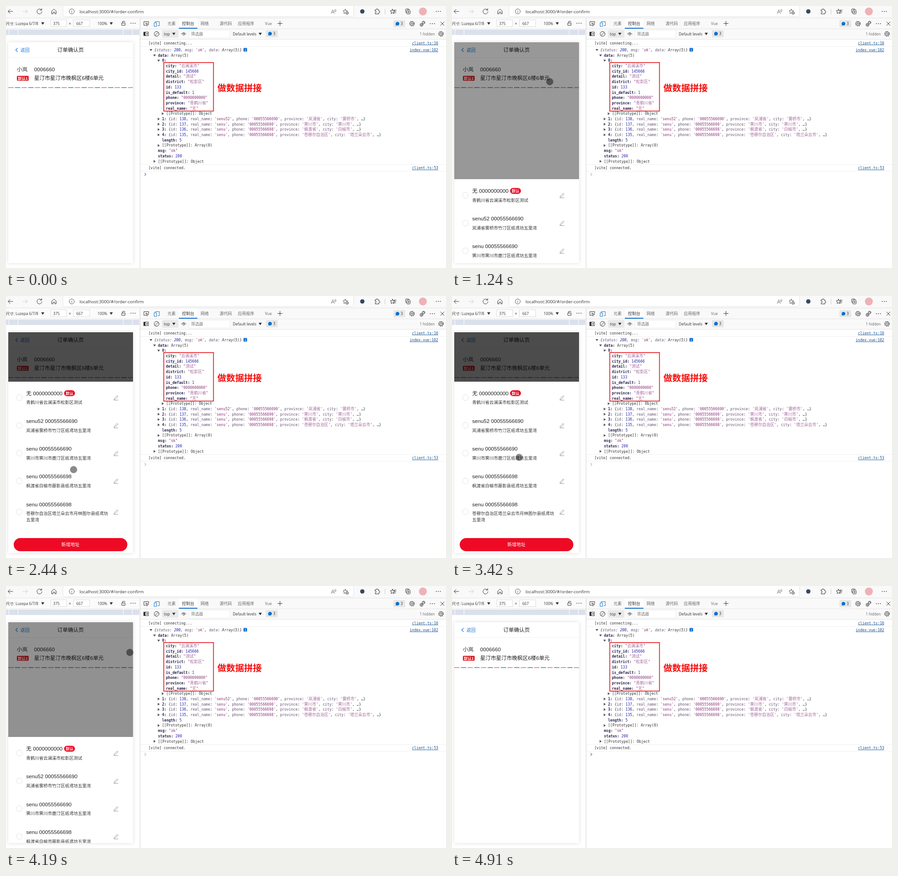
Animation, 970 px wide and 578 px high, one loop 5.77 s. Source, as an HTML page:

```html
<!DOCTYPE html>
<html lang="zh-CN">
<head>
<meta charset="utf-8">
<title>订单确认页</title>
<style>
  html, body { margin: 0; width: 100%; height: 100%; overflow: hidden; background: #fff; }
  svg { display: block; width: 970px; height: 578px; }
  text { white-space: pre; }
  .ui { font: 8.3px "Open Sans", "Noto Sans CJK SC", sans-serif; fill: #333; }
  .tab { font-size: 9px; fill: #666; }
  .mono { font: 8px "DejaVu Sans Mono", "Noto Sans CJK SC", monospace; fill: #303030; }
  .mono .key { font-weight: bold; fill: #29234f; }
  .mono .name { fill: #65506f; }
  .mono .str { fill: #8a3579; }
  .mono .num { fill: #2020a8; }
  .mono .han { font-size: 8.9px; font-weight: 300; fill: #a5679a; }
  .mono .link { fill: #15508f; text-decoration: underline; }
  .app { font: 11.7px "Liberation Sans", "Noto Sans CJK SC", sans-serif; fill: #222; }
  .small { font-size: 9.5px; fill: #333; }
  .tag { font-size: 8.5px; font-weight: bold; fill: #fff; }
  .icon { fill: none; stroke: #333; stroke-width: 1; stroke-linecap: round; stroke-linejoin: round; }
  .rule { stroke: #e4e4e4; fill: none; }
  .solid { fill: #333; stroke: none; }
</style>
</head>
<body>
<svg viewBox="0 0 970 578">
  <defs>
    <clipPath id="screen"><rect x="5" y="80" width="274.4" height="487"/></clipPath>
    <path id="down" d="M-3.5 -2.5h7l-3.5 5.5z"/>
    <g id="gear" stroke-width=".9"><circle r="4.2"/><circle r="1.7"/><circle r="5.2" stroke-width="1.3" stroke-linecap="butt" stroke-dasharray="2 2.08"/></g>
    <g id="dots"><circle cx="-4.5" r=".9"/><circle r=".9"/><circle cx="4.5" r=".9"/></g>
    <path id="star" d="M0 -5 1.5 -1.7 5 -1.3 2.4 1.1 3.1 4.6 0 2.9 -3.1 4.6 -2.4 1.1 -5 -1.3 -1.5 -1.7z"/>
    <g id="count"><rect width="26" height="16" rx="2" fill="#e7e7e7"/><path d="M9 4a4 4 0 1 1-2 7.4L4.8 12l.7-2A4 4 0 0 1 9 4z" fill="#0b6fd0"/><text x="16" y="11.2" class="ui">3</text></g>
    <path id="pencil" d="M-4 2.5 2.5 -4.5 4.5 -2.7 -2 3.7 -4.5 4.2zM-5 5.6H5" fill="none" stroke="#8b8c90" stroke-width=".9"/>
  </defs>

  <!-- browser bar -->
  <rect width="970" height="26" fill="#f9f9f9"/>
  <rect x="125.5" y="-8" width="641" height="31.5" rx="4" fill="#fff" stroke="#e3e3e3"/>
  <g class="icon">
    <path d="M15 12H4.5M9 7.5 4.5 12 9 16.5"/>
    <path d="M37 12H47.5M43 7.5 47.5 12 43 16.5" stroke="#ccc"/>
    <path d="M78 8.5A5.5 5.5 0 1 0 79.3 12.5M78.8 5.5V9H75.3"/>
    <path d="M101 11 105.8 6.8 110.6 11V17.2H107.6V13.5H104V17.2H101z"/>
    <circle cx="145" cy="12" r="5.5" stroke="#555"/><path d="M145 11.5V14.5M145 9.3V9.4" stroke="#555"/>
    <path d="M717 16.5 720.5 8 724 16.5M718.2 13.8H722.8M724.5 8.5q1.5 1.5 0 3.5M726.5 7q2.5 2.5 0 6" stroke="#777"/>
    <use href="#star" x="748" y="12" stroke="#555"/><circle cx="752" cy="15.5" r="3" fill="#fff" stroke="#555"/><path d="M750.5 15.5h3M752 14v3" stroke="#555" stroke-width=".8"/>
    <path d="M814 8.5h2.2a1.8 1.8 0 1 1 3.5 0H822v2.7a1.8 1.8 0 1 1 0 3.5v2.8h-8v-2.8a1.8 1.8 0 1 0 0-3.5z"/>
    <path d="M835.5 7V18" stroke="#ccc"/>
    <use href="#star" x="852" y="12"/><path d="M855 9H860M856 12H860M855 15H859" stroke-width="1.1"/>
    <rect x="881" y="6.5" width="7.5" height="8" rx="1.5"/><rect x="883.5" y="9" width="7.5" height="8.5" rx="1.5" fill="#f9f9f9"/><path d="M885.3 13.2h4M887.3 11.2v4"/>
  </g>
  <circle cx="785.5" cy="12" r="4.8" fill="#35495e"/>
  <circle cx="919" cy="12" r="8.7" fill="#efb1b6"/>
  <use href="#dots" x="953" y="12" class="solid"/>
  <text x="162" y="15.6" class="ui" style="font-size:9.7px">localhost:3000/#/order-confirm</text>

  <!-- device toolbar and ruler -->
  <rect y="26" width="295" height="25" fill="#fbfbfb"/>
  <path class="rule" d="M0 26.5H970M0 50.5H295"/>
  <g class="ui">
    <text x="0" y="42">尺寸: Luzepa 6/7/8</text>
    <rect x="98.5" y="30.5" width="35" height="15" fill="#fff" stroke="#dcdcdc"/><text x="104" y="42">375</text>
    <text x="138.5" y="42">×</text>
    <rect x="148.5" y="30.5" width="36" height="15" fill="#fff" stroke="#dcdcdc"/><text x="155" y="42">667</text>
    <text x="202" y="42">100%</text>
    <use href="#down" x="81" y="38.5"/><use href="#down" x="232" y="38.5"/>
    <use href="#dots" x="280" y="38"/>
  </g>
  <path class="icon" d="M255.5 37.5h7v5h-7zM257 37.5V34h4M261 34l1.5 1"/>
  <rect y="52" width="294" height="12" fill="#dbe1eb"/>
  <path d="M6.5 52V64M26.5 52V64M258.5 52V64M278.5 52V64" stroke="#fff"/>

  <!-- phone page -->
  <rect x="5" y="80" width="275" height="487" fill="#fff" style="filter:drop-shadow(0 0 4px rgba(0,0,0,.13))"/>
  <path d="M5 113.5H280" stroke="#f0f1f3"/>
  <g class="app">
    <path d="M25.5 93 21.5 97 25.5 101" fill="none" stroke="#1978dc" stroke-width="1.2"/>
    <text x="32" y="100.5" style="font-size:10px;fill:#1978dc">返回</text>
    <text x="113" y="100.7">订单确认页</text>
    <text x="24" y="143.5">小岚</text><text x="62" y="143.5">0006660</text>
    <rect x="24" y="154" width="26" height="11" rx="2" fill="#dd2128"/>
    <text x="26" y="162.7" class="tag">默认1</text>
    <text x="62" y="162.8">星汀市星汀市晚枫区6楼6单元</text>
  </g>
  <g fill="none" stroke-width="1.5" stroke-dasharray="11.7 17.63">
    <path d="M5 180H280" stroke="#ee6a6c"/><path d="M19.7 180H280" stroke="#2b83dd"/>
  </g>
  <g clip-path="url(#screen)">
    <rect id="shade" x="5" y="80" width="275" height="487" opacity="0"/>
    <g id="sheet" class="app">
      <rect x="5" y="189" width="275" height="378" fill="#fff"/>
      <g id="people"></g>
      <rect x="17" y="534" width="250.5" height="29" rx="14.5" fill="#ee0a24"/>
      <text x="142" y="552.4" text-anchor="middle" style="font-size:10px;font-weight:500;fill:#fff">新增地址</text>
    </g>
  </g>

  <!-- developer tools -->
  <rect x="295" y="27" width="675" height="47" fill="#f9f9f9"/>
  <rect x="381" y="27" width="41" height="23" fill="#fff"/>
  <path class="rule" d="M296 50.5H970M296 73.5H970"/>
  <path d="M295.5 27V578" stroke="#d2d2d2"/>
  <rect x="381" y="48" width="41" height="2" fill="#1573cf"/>
  <g class="icon">
    <path d="M308 42.5H304V34.5H314.5V38M308.5 37.5 314.5 40.3 311.8 41.2 310.8 44z"/>
    <path d="M329 36V34.5H338V43.5H335M327 37h5v8h-5z" stroke="#1573cf"/>
    <path d="M599 38.5H609M604 33.5V43.5"/>
    <use href="#gear" x="895" y="39"/>
    <path d="M914 41.5h4M916 39.5v4M919.5 35.5l2-2 2 2-2 2z" stroke-width=".8"/><circle cx="916" cy="41.5" r="3.3"/><circle cx="920.5" cy="36.5" r="3"/>
    <path d="M958 35 966 43M966 35 958 43"/>
    <rect x="304" y="57.5" width="10" height="8"/><path class="solid" d="M304 57.5h3.5v8H304zM309 61.5l3-2.2v4.4z"/>
    <circle cx="332" cy="61.5" r="5.3"/><path d="M328.3 65.2 335.7 57.8"/>
    <path d="M386.5 62q5-6.5 10.5 0"/><circle cx="391.8" cy="62.5" r="2"/>
    <use href="#gear" x="959" y="61.5"/>
  </g>
  <use href="#dots" x="940" y="39" class="solid"/>
  <use href="#count" x="854" y="31"/><use href="#count" x="573" y="53"/>
  <g class="ui">
    <text x="356" y="42" class="tab">元素</text><text x="388" y="42" style="font-size:9px">控制台</text>
    <text x="429" y="42" class="tab">网络</text><text x="471" y="42" class="tab">源代码</text>
    <text x="511" y="42" class="tab">应用程序</text><text x="571" y="42" class="tab" style="font-size:8.5px">Vue</text>
    <rect x="344" y="53" width="36" height="17" rx="2" fill="#e9e9e9"/><text x="348" y="64.8">top</text>
    <use href="#down" x="370" y="61.5"/>
    <rect x="403.5" y="53.5" width="90" height="17" fill="#fff" stroke="#eee"/><text x="408" y="65" style="font-size:8.8px;fill:#777">筛选器</text>
    <text x="500" y="64.8">Default levels</text><use href="#down" x="560.5" y="61.5"/>
    <text x="912" y="64.8" style="font-size:8.1px;fill:#666">1 hidden</text>
  </g>
  <path d="M296 89.5H970M296 349.5H970M296 364.5H970" stroke="#f0f0f0"/>
  <g class="mono">
    <text x="314" y="84.6">[vite] connecting...</text><text x="314" y="360.3">[vite] connected.</text>
    <text x="895" y="84.6" class="link">client.ts:16</text>
    <text x="890" y="99.7" class="link">index.vue:102</text>
    <text x="895" y="360.3" class="link">client.ts:53</text>
    <g id="tree"></g>
  </g>
  <rect x="523.5" y="92.5" width="8" height="8" rx="1.5" fill="#1b6fd0"/>
  <path d="M527.5 96V99M527.5 94V94.8" stroke="#fff"/>
  <path id="prompt" d="M305.5 368.5 308.5 371.5 305.5 374.5" fill="none" stroke="#2f7fd6" stroke-width="1.1"/>
  <rect x="347.8" y="124.8" width="109.6" height="107" fill="none" stroke="#e3191c" stroke-width="1.7"/>
  <text x="466" y="187.8" style="font:bold 19.6px 'Noto Sans CJK SC',sans-serif;fill:#f80d0d">做数据拼接</text>

  <g id="cursor">
    <circle id="touch" r="7.6" fill="rgba(0,0,0,.46)" stroke="rgba(0,0,0,.2)"/>
    <path id="arrow" d="M0 0V11.5L2.7 9 4.5 13.2 6.4 12.4 4.6 8.3H8.3z" fill="#fff" stroke="#222" stroke-width=".8"/>
  </g>
</svg>
<script>
const LOOP = 5770;
const $ = id => document.getElementById(id);

// console object tree: indent x, arrow ('v' open, '>' closed), text
const TREE = [
  [335, 'v', 'data: Array(5)'],
  [344, 'v', '0:'],
  [352.5, '', 'city: "云澜溪市"'],
  [352.5, '', 'city_id: 145666'],
  [352.5, '', 'detail: "测试"'],
  [352.5, '', 'district: "松影区"'],
  [352.5, '', 'id: 133'],
  [352.5, '', 'is_default: 1'],
  [352.5, '', 'phone: "0000000000"'],
  [352.5, '', 'province: "青鹤川省"'],
  [352.5, '', 'real_name: "无"'],
  [353, '>', '[[Prototype]]: Object'],
  [344, '>', "1: {id: 138, real_name: 'senu52', phone: '00055566690', province: '岚浦省', city: '雾桥市', …}"],
  [344, '>', "2: {id: 137, real_name: 'senu', phone: '00055566690', province: '霁川市', city: '霁川市', …}"],
  [344, '>', "3: {id: 136, real_name: 'senu', phone: '00055566698', province: '枫渡省', city: '白榆市', …}"],
  [344, '>', "4: {id: 135, real_name: 'senu', phone: '00055566698', province: '苍穆尔自治区', city: '塔兰朵云市', …}"],
  [344, '', 'length: 5'],
  [344, '>', '[[Prototype]]: Array(0)'],
  [335, '', 'msg: "ok"'],
  [335, '', 'status: 200'],
  [335, '>', '[[Prototype]]: Object'],
];

const span = (cls, s) => `<tspan class="${cls}">${s}</tspan>`;
const TOKEN = /Array\(\d\)|(^\w+:)|('[^']*'|"[^"]*")|(\w+(?=:))|(\b\d+\b)/g;
const colour = line => line.replace(TOKEN, (all, key, str, name, num) =>
  key ? span('key', key) :
  str ? span('str', str.replace(/[\u4e00-\u9fff]+/g, han => span('han', han))) :
  name ? span('name', name) :
  num ? span('num', num) : all);

const treeRow = (x, y, mark, line, style = '') => {
  const shape = { v: 'M-3 -2h6l-3 4.5z', '>': 'M-2 -3v6l4.5 -3z' }[mark];
  const arrow = shape ? `<path transform="translate(${x - 7.5} ${y - 2.8})" d="${shape}" fill="#555"/>` : '';
  return `${arrow}<text x="${x}" y="${y}" style="${style}">${colour(line)}</text>`;
};
$('tree').innerHTML =
  treeRow(327, 99.7, 'v', "{status: 200, msg: 'ok', data: Array(5)}", 'font-style:italic') +
  TREE.map(([x, mark, line], i) => treeRow(x, 111.7 + i * 11.69, mark, line)).join('');

// address list
const PEOPLE = [
  ['无 0000000000', '青鹤川省云澜溪市松影区测试'],
  ['senu52 00055566690', '岚浦省雾桥市竹汀区纸鸢坊五里湾'],
  ['senu 00055566690', '霁川市霁川市鹿汀区纸鸢坊五里湾'],
  ['senu 00055566698', '枫渡省白榆市藤影县纸鸢坊五里湾'],
  ['senu 00055566698', '苍穆尔自治区塔兰朵云市月林图尔县纸鸢坊', '五里湾'],
];
$('people').innerHTML = PEOPLE.map(([name, ...address], i) => {
  const y = 214.5 + i * 61.3;
  const mid = y + (address.length > 1 ? 16.5 : 9.7);
  return `<text x="44.5" y="${y + 4}">${name}</text>` +
    address.map((s, n) => `<text x="44.5" y="${y + 23.7 + n * 13.3}" class="small">${s}</text>`).join('') +
    `<circle cx="29.5" cy="${mid}" r="6.5" fill="none" stroke="#d9dadd" stroke-width=".8"/>` +
    `<use href="#pencil" x="242.5" y="${mid}"/>`;
}).join('') +
  '<rect x="128" y="208" width="24" height="13" rx="6.5" fill="#ee0a24"/>' +
  '<text x="140" y="217.7" class="tag" text-anchor="middle">默认</text>';

// motion: [ms, properties, easing to the next key]
const tracks = [];
function track(id, keys) {
  const frames = keys.map(([ms, props, easing = 'linear']) => ({ offset: ms / LOOP, easing, ...props }));
  const motion = $(id).animate(frames, { duration: LOOP, fill: 'both' });
  motion.pause();
  tracks.push(motion);
}
const toggle = (id, prop, first, ...changes) => {
  const keys = [[0, first], ...changes];
  keys.push([LOOP, keys[keys.length - 1][1]]);
  track(id, keys.map(([ms, value]) => [ms, { [prop]: value }, 'steps(1, end)']));
};

const drop = y => ({ transform: `translateY(${y}px)` });
track('sheet', [
  [0, drop(378)], [1140, drop(378), 'ease-out'], [1440, drop(0)],
  [4022, drop(0), 'ease-in'], [4322, drop(378)], [LOOP, drop(378)],
]);
track('shade', [
  [0, { opacity: 0 }], [1140, { opacity: 0 }, 'ease'], [1440, { opacity: .7 }],
  [4022, { opacity: .7 }, 'ease-in'], [4322, { opacity: 0 }], [LOOP, { opacity: 0 }],
]);

const PATH = [
  [0, 500, 600], [70, 500, 548, 'ease-out'], [580, 217, 170], [690, 217, 170], [900, 215.5, 167],
  [2110, 215.5, 167, 'ease-in-out'], [2440, 149, 383], [3380, 149, 383], [3420, 148, 356, 'ease-out'],
  [3910, 162, 122], [4040, 162, 122, 'ease-in'], [4190, 273, 146.5], [4250, 318, 180, 'ease-out'],
  [4580, 455, 307], [4600, 455, 307], [4850, 600, 545], [4910, 605, 600], [LOOP, 605, 600],
];
track('cursor', PATH.map(([ms, x, y, easing]) => [ms, { transform: `translate(${x}px, ${y}px)` }, easing]));
toggle('arrow', 'opacity', 0, [70, 1], [350, 0], [4230, 1], [4900, 0]);
toggle('touch', 'opacity', 0, [350, 1], [4230, 0]);
toggle('prompt', 'stroke', '#2f7fd6', [350, '#b5b5b5'], [4510, '#2f7fd6']);

// the picture holds between these instants, as in a screen recording
const INSTANTS = [0, 70, 140, 210, 290, 360, 430, 510, 580, 700, 770, 830, 900, 1050, 1180, 1240, 1310,
  1370, 1440, 1510, 2170, 2240, 2310, 2370, 2440, 3420, 3500, 3560, 3630, 3700, 3770, 3840, 3910,
  4040, 4120, 4190, 4250, 4320, 4380, 4450, 4520, 4580, 4650, 4710, 4780, 4850, 4910];

function draw() {
  const now = performance.now() % LOOP;
  const held = INSTANTS.findLast(ms => ms <= now);
  for (const motion of tracks) motion.currentTime = held;
  requestAnimationFrame(draw);
}
draw();
</script>
</body>
</html>
```
